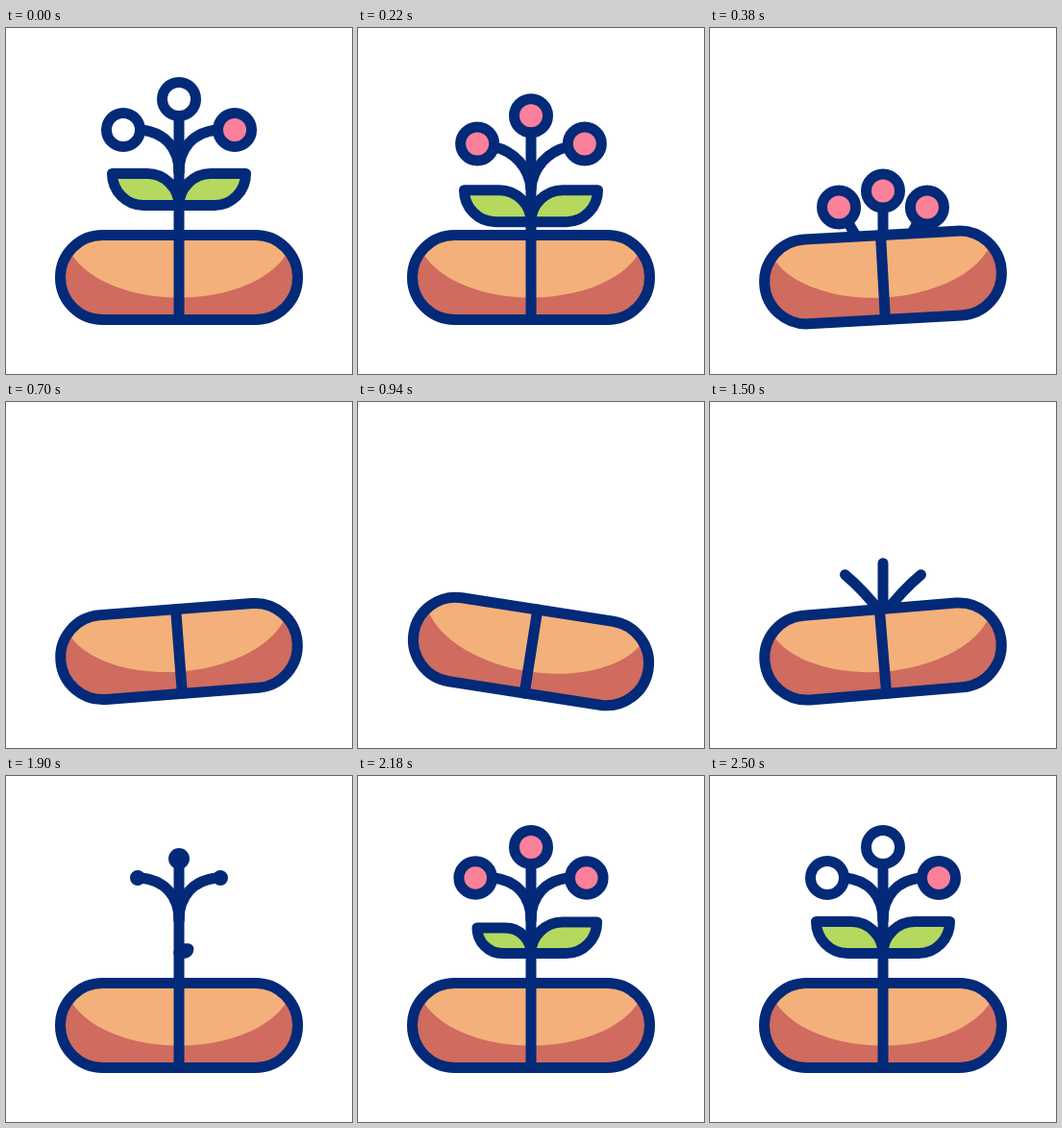
An HTML page for the animation above (2.6 s loop, 360 by 360 pixels).

```html
<!DOCTYPE html>
<html lang="en">
<head>
<meta charset="utf-8">
<title>Sprouting capsule</title>
<style>
  html, body { margin: 0; width: 100%; height: 100%; overflow: hidden; background: #fff; }
  svg { display: block; width: 100vw; height: 100vh; }
  .line { stroke: #022a78; stroke-width: 11; stroke-linecap: round; stroke-linejoin: round; fill: none; }
  .leaf { fill: #b5d95f; }
</style>
</head>
<body>
<svg viewBox="0 0 360 360">
  <defs>
    <clipPath id="body"><rect x="56.5" y="215.5" width="247" height="88" rx="44"/></clipPath>
    <clipPath id="above"><rect width="360" height="260"/></clipPath>
  </defs>
  <g class="line" clip-path="url(#above)">
    <path id="stem"/>
    <path id="branchL"/>
    <path id="branchR"/>
    <path id="leafL" class="leaf"/>
    <path id="leafR" class="leaf"/>
    <circle id="budT"/>
    <circle id="budL"/>
    <circle id="budR"/>
  </g>
  <g id="pill">
    <g clip-path="url(#body)">
      <rect x="50" y="205" width="260" height="110" fill="#cf6b5f"/>
      <ellipse cx="180" cy="213.5" rx="118" ry="67" fill="#f4b07a"/>
    </g>
    <g class="line">
      <rect x="56.5" y="215.5" width="247" height="88" rx="44"/>
      <path d="M180 215.5V303.5"/>
    </g>
  </g>
</svg>
<script>
const LOOP = 2600, DROP = 190, RING = 17.5, LINE = 11, PINK = '#fb809a';
const $ = id => document.getElementById(id);
const set = (id, attrs) => {
  for (const k in attrs) $(id).setAttribute(k, attrs[k]);
};
const show = s => s > 0 ? 'visible' : 'hidden';
const ease = (t, a, b) => {
  const u = Math.min(1, Math.max(0, (t - a) / (b - a)));
  return (1 - Math.cos(Math.PI * u)) / 2;
};

// Rocking of the capsule: [time, degrees]
const ROCK = [[200, 0], [590, -7.2], [1010, 10], [1400, -6.5], [1690, 0]];
function tilt(t) {
  let angle = 0;
  for (let i = 1; i < ROCK.length; i++) {
    angle += (ROCK[i][1] - ROCK[i - 1][1]) * ease(t, ROCK[i - 1][0], ROCK[i][0]);
  }
  return angle;
}

function leaf(id, side, s, dy) {
  const p = (x, y) => `${180 + side * x * s} ${184.5 - y * s + dy}`;
  set(id, {
    d: `M${p(0, 0)}C${p(0, 18)} ${p(15, 33)} ${p(33, 33)}L${p(69.5, 33)}` +
       `C${p(69.5, 15)} ${p(55, 0)} ${p(37, 0)}Z`,
    visibility: show(s)
  });
}

// A ring of constant line width that is solid while it is small.
function bud(id, cx, cy, s, fill) {
  const outer = RING * s + LINE / 2, inner = Math.max(0, outer - LINE);
  set(id, {
    cx, cy, fill, r: (outer + inner) / 2,
    style: `stroke-width:${outer - inner}`,
    visibility: show(s)
  });
}

function draw(t) {
  const sinking = t < 650;
  const p = sinking ? ease(t, 120, 640) : 1 - ease(t, 1200, 1720);
  const grow = (a, b) => sinking ? 1 : ease(t, a, b);
  const top = grow(1740, 2167), sides = grow(1800, 2210);
  const dy = DROP * p, fold = p / 0.38;
  const pale = t < 130 || t > 2270 ? '#fff' : PINK;

  set('stem', { d: `M180 ${96 + dy}V${Math.max(260, 100 + dy)}` });
  bud('budT', 180, 91.5 + dy - RING * top, top, pale);

  // Side flowers fold inward while sinking; bare branches rise straight.
  let ex = 40.5 - fold, ey = 106 + 2 * fold + dy;
  let cx = ex + RING * sides, cy = ey;
  if (sinking) {
    const a = Math.PI * (1 - 0.633 * p);
    cx = 58 - 24 * p;
    cy = 106 + 160 * p;
    ex = cx + RING * Math.cos(a);
    ey = cy + RING * Math.sin(a);
  }
  for (const [name, side, fill] of [['L', -1, pale], ['R', 1, PINK]]) {
    const x = v => 180 + side * v;
    set('branch' + name, {
      d: `M180 ${150 + dy}C${x(8 * fold)} ${125 + 15 * fold + dy} ` +
         `${x(15 + 10 * fold)} ${108 + 12 * fold + dy} ${x(ex)} ${ey}`
    });
    bud('bud' + name, x(cx), cy, sides, fill);
  }

  leaf('leafR', 1, grow(1800, 2210), dy);
  leaf('leafL', -1, grow(1890, 2300), dy);
  set('pill', { transform: `rotate(${tilt(t)} 180 259.5)` });
}

const start = performance.now();
function tick() {
  draw((performance.now() - start) % LOOP);
  requestAnimationFrame(tick);
}
draw(0);
requestAnimationFrame(tick);
</script>
</body>
</html>
```
